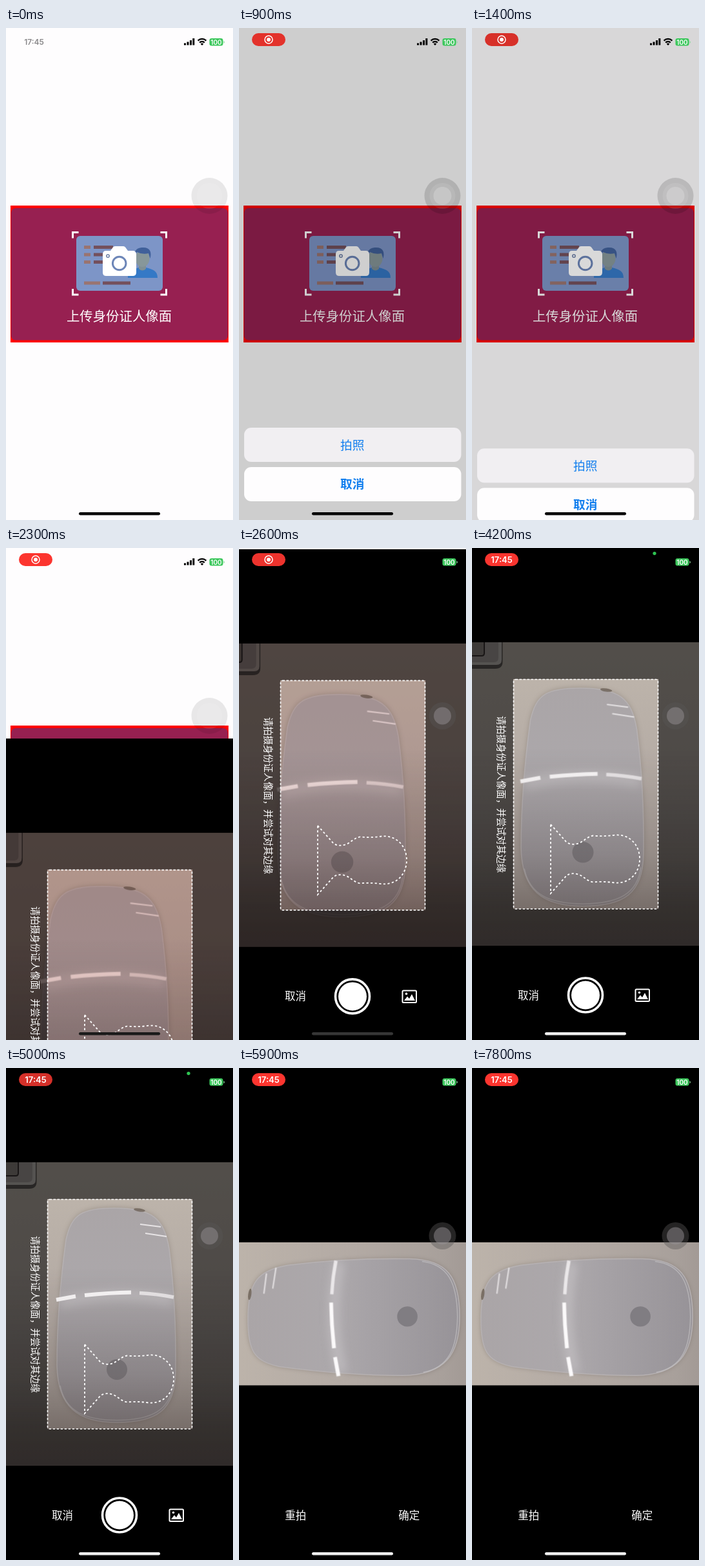
An HTML page for the animation above (8 s loop, 352 by 762 pixels).

```html
<!DOCTYPE html>
<html lang="zh">
<head>
<meta charset="utf-8">
<title>Upload</title>
<style>
html, body { margin: 0; width: 100%; height: 100%; overflow: hidden; background: #fefdfe; }
svg { display: block; }
text { font-family: "Noto Sans CJK SC", "Noto Sans CJK", sans-serif; text-anchor: middle; }
.num { font-family: Inter, Roboto, sans-serif; font-weight: 600; }
.line { fill: none; stroke: #fff; }
#tint { mix-blend-mode: multiply; }
</style>
</head>
<body>
<svg width="352" height="762" viewBox="0 0 352 762">
  <defs>
    <linearGradient id="table" x1="0" y1="0" x2="0" y2="1">
      <stop offset="0" stop-color="#bfb6ac"/>
      <stop offset=".5" stop-color="#b3aaa4"/>
      <stop offset=".8" stop-color="#a8a09b"/>
      <stop offset="1" stop-color="#9a918d"/>
    </linearGradient>
    <linearGradient id="shell" x1="0" y1="0" x2="0" y2="1">
      <stop offset="0" stop-color="#aaa5a7"/>
      <stop offset=".42" stop-color="#aca8ab"/>
      <stop offset=".6" stop-color="#a5a1a5"/>
      <stop offset="1" stop-color="#979398"/>
    </linearGradient>
    <linearGradient id="shade" x1="0" y1="0" x2="0" y2="1">
      <stop offset=".35" stop-color="#3c302c" stop-opacity="0"/>
      <stop offset=".7" stop-color="#3c302c" stop-opacity=".2"/>
      <stop offset=".88" stop-color="#3c302c" stop-opacity=".42"/>
      <stop offset="1" stop-color="#3c302c" stop-opacity=".46"/>
    </linearGradient>
    <filter id="soft" x="-20%" y="-20%" width="140%" height="140%"><feGaussianBlur stdDeviation="4"/></filter>
    <filter id="glow" x="-20%" y="-200%" width="140%" height="500%"><feGaussianBlur stdDeviation=".7"/></filter>
    <filter id="haze" x="-20%" y="-200%" width="140%" height="500%"><feGaussianBlur stdDeviation="7"/></filter>
    <clipPath id="view"><rect y="146" width="352" height="469.5"/></clipPath>
    <path id="body" d="M168 217C118 217 102 226 93 266C86 318 79 390 79 460C80 526 112 549 172 549C234 549 262 530 263 470C264 400 260 335 253 280C245 232 226 217 168 217Z"/>
    <rect id="desk" y="146" width="352" height="470" fill="url(#table)"/>
    <g id="mouse">
      <use href="#body" fill="#60564f" opacity=".4" filter="url(#soft)"/>
      <use href="#body" fill="url(#shell)" stroke="#b6b1b2" stroke-width="1.600"/>
      <path d="M84 492C92 532 122 545 172 545.5C226 545 254 530 259 490" fill="none" stroke="#c9c6c9" stroke-width="1.5" opacity=".6"/>
      <path d="M84 364Q165 342 258 360" fill="none" stroke="#d5d2d5" stroke-width="18" opacity=".4" filter="url(#haze)"/>
      <g filter="url(#glow)" fill="none" stroke="#fbf9fa">
        <path d="M78 359L108 353.5" stroke-width="6"/>
        <path d="M122 352Q160 348 194 347.500" stroke-width="6"/>
        <path d="M207 348.500Q235 350 260 355" stroke-width="5.500" opacity=".75"/>
        <path d="M208 242L240 246M216 256L249 261" stroke-width="2" opacity=".75"/>
      </g>
      <ellipse cx="207" cy="220" rx="9" ry="2.500" transform="rotate(8 207 220)" fill="#6d6257" opacity=".8"/>
      <circle cx="172" cy="467" r="16" fill="#807d82"/>
    </g>
  </defs>

  <rect width="352" height="762" fill="#fefdfe"/>
  <g id="page">
    <rect x="7" y="275" width="338" height="212" fill="#fe0000"/>
    <rect x="8" y="279" width="336" height="204.500" rx="7" fill="#972051"/>
    <rect x="109" y="322" width="134" height="85" rx="6" fill="#7d95c7"/>
    <path class="line" stroke-width="3" d="M103.500 325.500V316.500H112.500M239.500 316.500H248.500V325.500M248.500 404V413H239.500M112.500 413H103.500V404"/>
    <g stroke-width="5">
      <path stroke="#9a7470" d="M121 339.500h10M121 351h10M121 362.500h10M121 395h25"/>
      <path stroke="#74505c" d="M136 339.500h30M136 351h22M136 362.500h22M150 395h43"/>
    </g>
    <path fill="#3579c6" d="M189 387C189 376 198 374 206 371Q211 377 217 371C228 374 235 376 235 387Z"/>
    <path fill="#7f8f94" d="M206 364h11v9q-5.500 5-11 0Z"/>
    <ellipse cx="211.500" cy="357" rx="11" ry="13" fill="#87979a"/>
    <path fill="#40609a" d="M199 356C197 343 206 339.500 213 340C223 340 226.500 347 223.500 357L221 349Q211 351 203 347Q201 350 199 356Z"/>
    <path fill="#fff" d="M155 345H162L166 339.500Q167 338 169 338H182Q184 338 185 339.500L189 345H196.500Q202 345 202 350.500V378.500Q202 384 196.500 384H155.500Q150 384 150 378.500V350.500Q150 345 155 345Z"/>
    <circle cx="175.700" cy="364.500" r="10.300" fill="none" stroke="#6d86b8" stroke-width="3"/>
    <circle cx="158" cy="353" r="2.200" fill="none" stroke="#5a6f9c" stroke-width="1.300"/>
    <text x="175.500" y="454" font-size="20.400" fill="#fff">上传身份证人像面</text>
  </g>
  <rect id="dim" width="352" height="762"/>
  <g id="sheet">
    <rect x="8" y="619" width="336.500" height="53" rx="11" fill="#f1eff2"/>
    <rect x="8" y="680" width="336.500" height="53" rx="11" fill="#fefdfe"/>
    <g font-size="18.700" fill="#137fee">
      <text x="175.700" y="652.500">拍照</text>
      <text x="175.700" y="713" font-weight="700">取消</text>
    </g>
  </g>

  <g id="camera">
    <rect width="352" height="770"/>
    <g clip-path="url(#view)">
      <use href="#desk"/>
      <g id="keys">
        <path d="M-40 130H47.500V176Q47.500 187 36 187H-40Z" fill="#5e5856"/>
        <path d="M-40 130H46V173Q46 181 38 181H-40Z" fill="#c6c0bd"/>
        <path d="M-40 130H41V170Q41 177 34 177H-40Z" fill="#a8a19e"/>
        <path d="M-40 130H19V163Q19 167 15 167H-40Z" fill="#8d8683" stroke="#3a3433" stroke-width="2"/>
      </g>
      <use id="live" href="#mouse"/>
      <rect y="146" width="352" height="470" fill="url(#shade)"/>
      <path fill-rule="evenodd" fill-opacity=".57" d="M0 146H352V616H0ZM64 203V559H289V203Z"/>
      <rect id="tint" y="146" width="352" height="470" fill="#ecc9c5"/>
    </g>
    <rect class="line" x="64.500" y="203.500" width="224" height="355.500" rx="3" stroke-width="1.600" stroke-dasharray="3.500 2.500"/>
    <path class="line" stroke-width="1.800" stroke-dasharray="3.200 3.400" d="M122 428L146 455Q153 461 165 457.500C173 455 178 447 188 445.500Q203 447 218 445C243 441 260 459 260 481.500S243 522 218 518Q203 516 188 517.500C178 516 173 508 165 505.500Q153 502 146 508L122 535Z"/>
    <text transform="translate(39.500 260) rotate(90)" font-size="14.300" fill="#fff" style="text-anchor:start">请拍摄身份证人像面，并尝试对其边缘</text>
    <text x="87.500" y="698.500" font-size="16.500" fill="#fff">取消</text>
    <circle class="line" cx="176" cy="692.500" r="26.500" stroke-width="3.600"/>
    <circle cx="176" cy="692.500" r="22" fill="#fff"/>
    <rect class="line" x="253.500" y="683.500" width="21.500" height="18.500" rx="1.500" stroke-width="2"/>
    <path fill="#fff" d="M256 699L261 692.500L264 696L268 689L273 699Z"/>
    <circle cx="259.500" cy="688.500" r="1.800" fill="#fff"/>
  </g>

  <g id="preview">
    <rect width="352" height="762"/>
    <svg y="270" width="352" height="221.500">
      <g transform="matrix(0 -.982 .989 0 -200.800 283.800)">
        <use href="#desk"/>
        <use href="#mouse"/>
      </g>
    </svg>
    <g font-size="16.500" fill="#fff">
      <text x="87.700" y="698.500">重拍</text>
      <text x="263.700" y="698.500">确定</text>
    </g>
  </g>

  <g id="touchLight">
    <circle id="halo" cx="315.500" cy="260" r="28"/>
    <circle cx="315.500" cy="260" r="20" fill="#fff" fill-opacity=".09"/>
    <circle id="knob" cx="315.500" cy="260" r="14" fill="#fff"/>
  </g>
  <g id="touchDark">
    <circle cx="315.500" cy="260" r="21" fill="#5a5656" fill-opacity=".42"/>
    <circle cx="315.500" cy="260" r="13.500" fill="#969296" fill-opacity=".48"/>
  </g>

  <g id="status">
    <path d="M276 23.500h3v3h-3zM280.500 21.500h3v5h-3zM285 19h3v7.500h-3zM289.300 16h3v10.500h-3z"/>
    <path fill="none" stroke="#000" stroke-width="2.300" d="M297.600 19.600A9 9 0 0 1 310.400 19.600M300.200 22.600A5.300 5.300 0 0 1 307.800 22.600"/>
    <path d="M304 27l-2.200-2.300a3 3 0 0 1 4.400 0z"/>
    <rect x="315.500" y="16" width="21" height="11.500" rx="3.300" fill="#3cc75c"/>
    <path d="M337.500 20v3.800q1.500-.5 1.500-1.900t-1.500-1.900z" fill="#8fd9a0"/>
    <text class="num" x="326" y="25.500" font-size="10" fill="#fff">100</text>
    <circle id="dot" cx="283" cy="8.300" r="2.600" fill="#2fc552"/>
    <text id="clock" class="num" x="43.500" y="26" font-size="12" fill="#8a898b">17:45</text>
    <g id="pill">
      <rect id="pillBox" x="20" y="8" width="52" height="20" rx="10"/>
      <g id="rec">
        <circle class="line" cx="46" cy="18" r="6" stroke-width="1.500"/>
        <circle cx="46" cy="18" r="3" fill="#fff"/>
      </g>
      <text id="pillTime" class="num" x="46" y="22.700" font-size="13" fill="#fff">17:45</text>
    </g>
  </g>
  <rect id="home" x="113" y="750" width="126" height="4.500" rx="2.250"/>
</svg>
<script>
const LOOP = 8000;
const el = id => document.getElementById(id);
const set = (id, name, value) => el(id).setAttribute(name, value);
const fade = (id, value) => set(id, "opacity", value);
const moveY = (id, y) => set(id, "transform", `translate(0 ${y})`);

// Linear value from [time, value] steps
function track(steps, t) {
  let [t0, v0] = steps[0];
  for (const [t1, v1] of steps) {
    if (t < t1) return v0 + (v1 - v0) * Math.max(0, (t - t0) / (t1 - t0));
    [t0, v0] = [t1, v1];
  }
  return v0;
}

// Critically damped spring, 0 to 1
function spring(t, start, speed) {
  const x = Math.max(0, t - start) / 1000 * speed;
  return 1 - (1 + x) * Math.exp(-x);
}

const TRACKS = {
  pill: [[100, 0], [400, 1]],
  time: [[2900, 0], [3100, 1]],
  dot: [[3150, 0], [3300, 1], [5600, 1], [5700, 0]],
  halo: [[100, .085], [300, .14], [1700, .14], [1900, .085]],
  knob: [[100, .03], [300, .2], [1700, .2], [1900, .03]],
  dark: [[2350, 0], [2600, 1]],
  tint: [[2350, .8], [3100, 0]],
  home: [[2200, 0], [2300, 26], [3400, 128], [4000, 240]],
  panX: [[2300, -18], [3200, 0]],
  panY: [[2300, 12], [3200, 0]],
  wide: [[3300, 1.075], [3600, 1.07], [4700, 1]],
  tall: [[3600, 1.038], [4700, 1]]
};

function draw(t) {
  const v = {};
  for (const k in TRACKS) v[k] = track(TRACKS[k], t);

  const open = spring(t, 200, 15) * (1 - spring(t, 1350, 17));
  fade("dim", open * .19);
  moveY("sheet", (1 - open) * 150);

  const slide = 762 * (1 - spring(t, 2200, 20.5));
  moveY("camera", slide);
  const shot = t >= 5400;
  set("preview", "display", shot ? "inline" : "none");
  set("camera", "display", t < 2200 || shot ? "none" : "inline");
  set("keys", "transform", `translate(${v.panX * 1.2} ${v.panY})`);
  set("live", "transform",
    `translate(${171.5 + v.panX} ${218 + v.panY}) scale(${v.wide} ${v.tall}) translate(-171.5 -218)`);
  fade("tint", v.tint);

  fade("touchLight", 1 - v.dark);
  fade("touchDark", v.dark);
  set("halo", "fill-opacity", v.halo);
  set("knob", "fill-opacity", v.knob);

  const glow = (1 + Math.cos((t - 5900) / 1850 * 2 * Math.PI)) / 2;
  set("pillBox", "fill", `rgb(${213 + 40 * glow},${48 + 5 * glow},${41 + 6 * glow})`);
  fade("pill", v.pill);
  fade("clock", 1 - v.pill);
  fade("rec", 1 - v.time);
  fade("pillTime", v.time);
  fade("dot", v.dot);
  set("home", "fill", `rgb(${v.home},${v.home},${v.home})`);
}

const begin = performance.now();
function tick() {
  draw((performance.now() - begin) % LOOP);
  requestAnimationFrame(tick);
}
tick();
</script>
</body>
</html>
```
